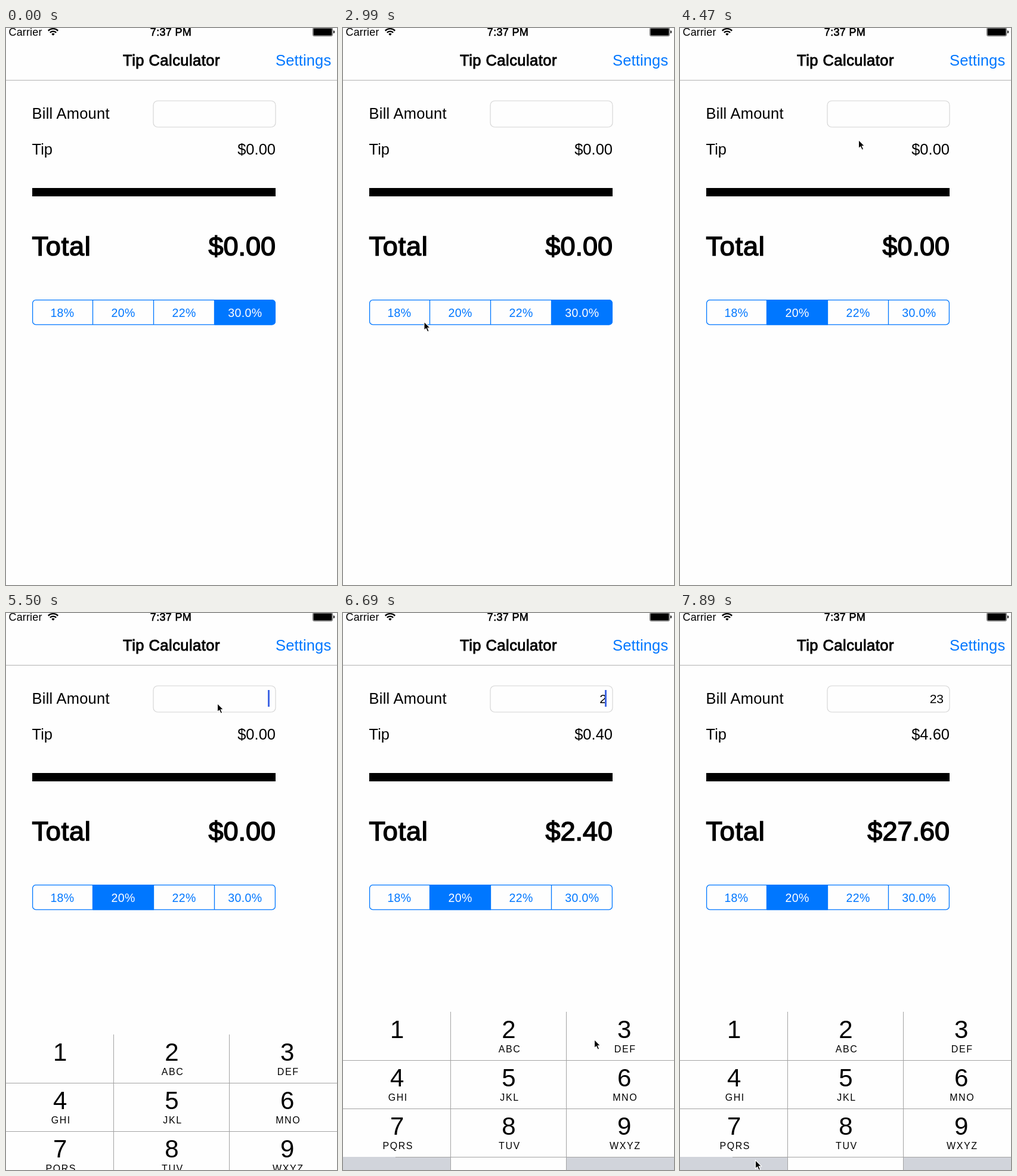
Recreate the animation shown at these times as an HTML page. Size 555 by 933 pixels, loop 8000 ms.

```html
<!DOCTYPE html>
<html lang="en">
<head>
<meta charset="utf-8">
<title>Tip Calculator</title>
<style>
  html, body { margin: 0; width: 100%; height: 100%; overflow: hidden; background: #fefefe; }
  svg { display: block; width: 555px; height: 933px; }
  text { font: 25.5px "Liberation Sans", Arial, sans-serif; }
  .medium { stroke: #000; stroke-width: .035em; letter-spacing: .018em; }
  .status { font-size: 18px; }
  .total { font-size: 45px; }
  .amount { text-anchor: end; letter-spacing: 0; }
  .percent { font-size: 19.5px; letter-spacing: .4px; text-anchor: middle; }
  .digit { font-size: 42px; text-anchor: middle; }
  .letters { font-size: 16px; letter-spacing: 1.6px; text-anchor: middle; }
</style>
</head>
<body>
<svg viewBox="0 0 555 933">
  <rect width="555" height="933" fill="#fefefe"/>

  <text class="status" x="4.5" y="13" letter-spacing=".15">Carrier</text>
  <g fill="none" stroke="#000" stroke-width="2.3">
    <path d="M70.8 4.6a11.6 11.6 0 0 1 16.4 0M73.8 7.8a7.4 7.4 0 0 1 10.4 0"/>
    <path d="M79 12.8l-2.7-2.8a3.8 3.8 0 0 1 5.4 0z" fill="#000" stroke="none"/>
  </g>
  <text class="medium status" x="276.5" y="13" text-anchor="middle">7:37 PM</text>
  <rect x="514.5" y="-.5" width="33" height="14" rx="2" fill="none" stroke="#444" stroke-width=".8"/>
  <rect x="515.5" y=".5" width="31" height="12" rx="1"/>
  <path d="M549 4q2 0 2 2.5t-2 2.5z"/>

  <text class="medium" x="277.5" y="63" text-anchor="middle">Tip Calculator</text>
  <text x="452" y="63" fill="#0077ff" letter-spacing=".15">Settings</text>
  <path d="M0 87.5H555" stroke="#b2b2b2"/>

  <text x="43.5" y="152" letter-spacing=".25">Bill Amount</text>
  <rect x="247" y="122" width="205" height="44" rx="7.5" fill="#fefefe" stroke="#d6d6d6" stroke-width="1.2"/>
  <text id="bill" class="amount" x="442" y="151" style="font-size:21px"></text>
  <rect id="caret" x="439" y="129" width="3" height="28" fill="#4268e4"/>

  <text x="43.5" y="212">Tip</text>
  <text id="tip" class="amount" x="452" y="212"></text>
  <rect x="44" y="268" width="408" height="14"/>
  <text class="medium total" x="43.5" y="380.5">Total</text>
  <text id="total" class="medium total amount" x="452" y="380.5"></text>

  <clipPath id="rounded"><rect x="44" y="455" width="408" height="42.5" rx="6"/></clipPath>
  <rect id="selection" y="455" width="102.5" height="43" fill="#0077ff" clip-path="url(#rounded)"/>
  <g fill="none" stroke="#0077ff" stroke-width="1.3">
    <rect x="44.6" y="455.6" width="406.8" height="41.3" rx="5.5"/>
    <path d="M145.5 456v41M247.5 456v41M349.5 456v41"/>
  </g>
  <g id="percents"></g>

  <g id="keyboard"></g>
  <path id="cursor" d="M0 0V14.2L3.2 11.3L5.7 16.8L8.2 15.7L5.8 10.3H10.2Z" stroke="#fff" stroke-width="1.1"/>
</svg>
<script>
const LOOP = 8000, FIRST_STEP = 900, STEP = 148;
const $ = id => document.getElementById(id);
const rates = [.18, .2, .22, .3];

const CHOOSE_18 = 16, CHOOSE_20 = 21, EDIT = 28, KEYBOARD_UP = 29.65;
const presses = [{ key: 2, at: 36 }, { key: 3, at: 40 }];
const KEY_TOP = 668, ROW = 81, columnEdges = [0, 180.5, 374.5, 568];

const cursorStops = [
  { at: 0, x: 266, y: 785 },
  { at: 4, x: 205, y: 171 },
  { at: 8, x: 88, y: 448 },
  { at: 11, x: 163, y: 507 },
  { at: 17, x: 108, y: 476 },
  { at: 22, x: 267, y: 481 },
  { at: 24, x: 299, y: 187 },
  { at: 26, x: 317, y: 142 },
  { at: EDIT, x: 317, y: 142 },
  { at: 31, x: 354, y: 151 },
  { at: 36, x: 275, y: 740 },
  { at: 39, x: 421, y: 714 },
  { at: 41, x: 440, y: 714 },
  { at: 47, x: 126, y: 916 }
];

function cursorAt(step) {
  const next = Math.max(1, cursorStops.findIndex(stop => stop.at >= step));
  const from = cursorStops[next - 1], to = cursorStops[next];
  const part = (step - from.at) / (to.at - from.at);
  const eased = part * part * (3 - 2 * part);
  return { x: from.x + (to.x - from.x) * eased, y: from.y + (to.y - from.y) * eased };
}

function buildKeyboard() {
  const letters = ["", "ABC", "DEF", "GHI", "JKL", "MNO", "PQRS", "TUV", "WXYZ"];
  const cell = (column, row, attributes) => {
    const left = columnEdges[column];
    return `<rect x="${left}" y="${row * ROW}" width="${columnEdges[column + 1] - left}" height="${ROW}" ${attributes}/>`;
  };
  const grey = 'fill="#d1d4db"';
  let markup = `<rect width="555" height="${ROW * 4}" fill="#fefefe"/>` + cell(0, 3, grey) + cell(2, 3, grey);
  letters.forEach((label, i) => {
    const column = i % 3, row = Math.floor(i / 3);
    const center = (columnEdges[column] + columnEdges[column + 1]) / 2 + .5;
    markup += cell(column, row, `id="key${i + 1}" ${grey}`) +
      `<text class="digit" x="${center}" y="${row * ROW + 44}">${i + 1}</text>
       <text class="letters" x="${center + 1.5}" y="${row * ROW + 67.5}">${label}</text>`;
  });
  markup += `<path d="M180.5 0v${ROW * 4}M374.5 0v${ROW * 4}M0 81.5H555M0 162.5H555M88 243.5H555" stroke="#a3a3a3"/>`;
  $("keyboard").innerHTML = markup;
}

// Critically damped spring.
function keyboardOffset(step) {
  const x = 2.72 * Math.max(0, step - KEYBOARD_UP);
  return ROW * 4 * (1 + x) * Math.exp(-x);
}

function draw(time) {
  const step = Math.floor((time - FIRST_STEP) / STEP);
  const selected = step < CHOOSE_18 ? 3 : step < CHOOSE_20 ? 0 : 1;
  const typed = presses.filter(press => step > press.at);
  const bill = typed.map(press => press.key).join("");
  const tip = bill * rates[selected];

  $("bill").textContent = bill;
  $("tip").textContent = "$" + tip.toFixed(2);
  $("total").textContent = "$" + (+bill + tip).toFixed(2);

  $("selection").setAttribute("x", 43.5 + selected * 102);
  [...$("percents").children].forEach((label, i) =>
    label.setAttribute("fill", i === selected ? "#fff" : "#0077ff"));

  const blinkStart = typed.length ? typed[typed.length - 1].at + 1 : EDIT;
  const caretOn = step >= EDIT && (step - blinkStart) % 7 < 4;
  $("caret").style.visibility = caretOn ? "visible" : "hidden";

  $("keyboard").setAttribute("transform", `translate(0 ${Math.round(KEY_TOP + keyboardOffset(step))})`);
  for (let key = 1; key <= 9; key++) {
    const pressed = presses.some(press => press.key === key && press.at === step);
    $("key" + key).style.visibility = pressed ? "visible" : "hidden";
  }

  const lastStop = cursorStops[cursorStops.length - 1].at;
  const { x, y } = cursorAt(Math.min(lastStop, Math.max(0, step)));
  $("cursor").setAttribute("transform", `translate(${x + .5} ${y + .5})`);
  $("cursor").style.visibility = step >= 0 ? "visible" : "hidden";
}

$("percents").innerHTML = rates.map((rate, i) =>
  `<text class="percent" x="${94.5 + i * 102.1}" y="483.5">${(rate * 100).toFixed(i < 3 ? 0 : 1)}%</text>`).join("");
buildKeyboard();

const start = performance.now();
function frame() {
  draw((performance.now() - start) % LOOP);
  requestAnimationFrame(frame);
}
frame();
</script>
</body>
</html>
```
